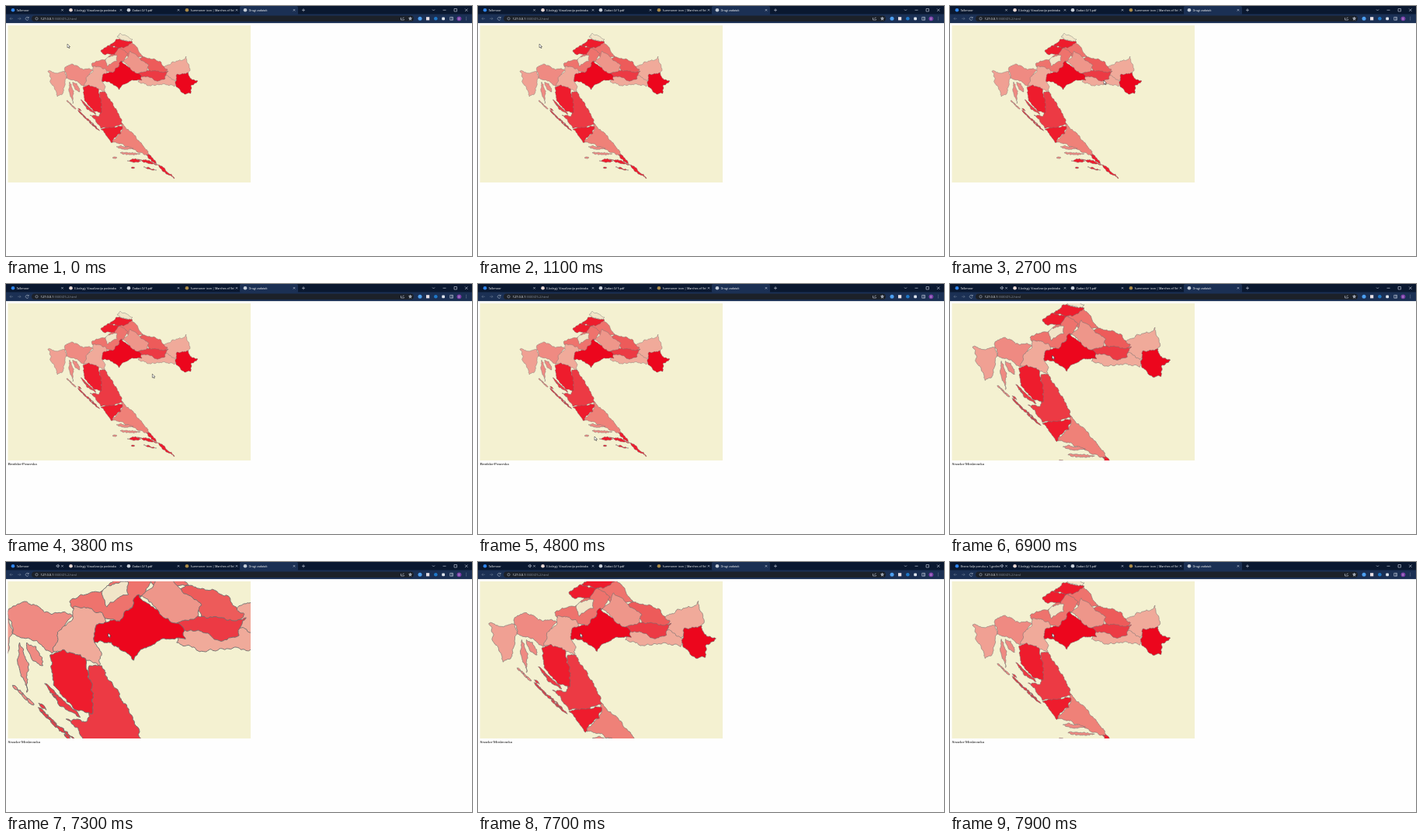
An HTML page that plays this animation: 600 px wide and 323 px high, repeating every 8000 ms.

```html
<!DOCTYPE html>
<html lang="hr">
<head>
<meta charset="utf-8">
<title>Drugi zadatak</title>
<style>
html, body { margin: 0; width: 100%; height: 100%; overflow: hidden; background: #fefefe; }
#stage { display: block; width: 100vw; height: 100vh; }
.ui text { font: 3.7px "Open Sans", "Noto Sans", sans-serif; fill: #fff; }
.ui path { fill: none; stroke: #cdd5e2; stroke-width: .6; }
#label { font: 5px "Liberation Serif", "Times New Roman", serif; fill: #000; }
#map path { stroke: #707070; stroke-width: .4; stroke-linejoin: round; }
</style>
</head>
<body>
<svg id="stage" viewBox="0 0 600 323" preserveAspectRatio="none">
  <g class="ui">
    <rect width="600" height="11" fill="#0a1830"/>
    <rect y="10.5" width="600" height="11.6" fill="#1b3054"/>
    <rect x="301" width="75" height="12" rx="2" fill="#1b3054"/>
    <rect x="33" y="12.5" width="492" height="7.6" rx="3.8" fill="#1c2129"/>
    <g id="tabs"></g>
    <path id="sound" d="M65 4.3h1l1.3-1.2v4L66 5.9h-1zM68.3 4v2"/>
    <path d="M381 5.3h4m-2-2v4M549 4.5l1.5 1.5 1.5-1.5M562.5 5.3h4M577 3.5h3.5v3.5h-3.5zM591 3.5l3.5 3.5m0-3.5l-3.5 3.5"/>
    <path d="M9 16.3H5m1.7-1.7L5 16.3l1.7 1.7M15 16.3h4m-1.7-1.7l1.7 1.7-1.7 1.7" opacity=".4"/>
    <path d="M29 15.4a2 2 0 1 0 .1 1.7m.1-3.3v1.7h-1.7" opacity=".8"/>
    <circle cx="39.5" cy="16.3" r="1.6" fill="none" stroke="#cdd5e2" stroke-width=".5"/>
    <text x="44.5" y="17.7" style="font-size:4px">127.0.0.1<tspan fill="#8d949e">:5500/Z5-2.html</tspan></text>
    <path d="M508.5 15v3h4v-1m-2-.5q.2-1.5 2-1.5M518.5 15.6h4l-3.2 2.6 1.2-4 1.2 4z"/>
    <circle cx="533" cy="16.3" r="2.5" fill="#4d9ff0"/>
    <rect x="541" y="14.2" width="4.2" height="4.2" fill="#e8dfe4"/>
    <circle cx="553.3" cy="16.3" r="2.3" fill="#1f78c8"/>
    <rect x="561.2" y="14.4" width="3.8" height="3.8" rx="1" fill="#dde3ec"/>
    <path d="M571.7 14.4h3.8v3.8h-3.8zM574 14.4v3.8"/>
    <circle cx="583.4" cy="16.3" r="2.9" fill="#7b3fa8"/>
    <text x="582.4" y="17.5" style="font-size:3.3px">E</text>
    <path d="M592.6 14.3v4" stroke-dasharray=".7 1"/>
  </g>
  <svg x="2.5" y="25" width="312.5" height="203" viewBox="2.5 25 312.5 203">
    <rect x="2" y="25" width="314" height="204" fill="#f4f1d1"/>
    <g id="map"></g>
  </svg>
  <text id="label" x="2.5" y="233.9"></text>
  <path id="cursor" d="M0 0V4.9L1.2 3.9 2 5.7 2.9 5.3 2.1 3.6H3.6Z" fill="#fff" stroke="#222" stroke-width=".5"/>
</svg>
<script>
const $ = id => document.getElementById(id);

function tab(x, end, title, icon) {
  $('tabs').insertAdjacentHTML('beforeend',
    `<circle cx="${x}" cy="5.3" r="2.3" fill="${icon}"/>
     <svg x="${x + 4.6}" width="${end - x - 8}" height="11"><text y="6.6">${title}</text></svg>
     <path d="M${end - 1.2} 4.1l2.4 2.4m0-2.4l-2.4 2.4"/>`);
}
tab(9, 72.5, 'Talkmoor', '#2f86ee');
tab(83.5, 148, 'E-kolegij: Vizualizacija podataka', '#e8d8d4');
tab(158, 222, 'Zadaci LV 5.pdf', '#c9d0da');
tab(233, 297, 'Summoner icon | Marches of Velor', '#a98a48');
tab(308, 371, 'Drugi zadatak', '#c3ccd8');
const firstTitle = $('tabs').querySelector('text');

const noise = s => { s = Math.sin(s) * 43758; return s - Math.floor(s); };

// Fractal line from a to b: every midpoint is pushed sideways by seeded noise.
function rough(a, b) {
  const dx = b[0] - a[0], dy = b[1] - a[1], len = Math.hypot(dx, dy);
  if (len < 1.5) return [a];
  const push = (noise(a[0] * 13 + a[1] * 78 + b[0] * 38 + b[1] * 11) - .5) * Math.min(.4, 2.4 / len);
  const m = [(a[0] + b[0]) / 2 - dy * push, (a[1] + b[1]) / 2 + dx * push];
  return [...rough(a, m), ...rough(m, b)];
}
function area(fill, corners) {
  const p = corners.split(' ').map(s => s.split(',').map(Number));
  const line = p.flatMap((a, i) => rough(a, p[(i + 1) % p.length]));
  const d = 'M' + line.map(q => q.map(v => v.toFixed(2))).join('L') + 'Z';
  $('map').insertAdjacentHTML('beforeend', `<path d="${d}" fill="${fill}"/>`);
}
// Slim island starting at x,y and running along dx,dy
function isle(fill, x, y, dx, dy, width) {
  const len = Math.hypot(dx, dy), nx = -dy / len * width / 2, ny = dx / len * width / 2;
  const at = (u, side) => `${x + dx * u + nx * side},${y + dy * u + ny * side}`;
  area(fill, [at(0, 0), at(.3, -1), at(.75, -.8), at(1, 0), at(.6, 1), at(.25, .7)].join(' '));
}

const peach = '#f0aa9a', pink = '#ef8a82', coral = '#ee736d', red = '#ec3a44',
  deep = '#ee1c2d', vivid = '#ec061d', pale = '#f1e5c8';

// Later counties overlap earlier ones, so each border is set by the upper one.
area(coral, '149,47 162,46 170,56 177,66 158,66 146,56');
area(coral, '110,75 119,71 128,69 145,53 151,57 157,62 150,72 138,87 128,84 112,79');
area(deep, '122,58 132,51 146,54 140,63 125,62');
area(deep, '133,51 142,43 157,45 163,46 155,52 146,54');
area(pale, '143,40 147,35 163,43 157,46 150,44');
area(pale, '128,70 131,66 143,64 143,71 136,74 131,78');
area(peach, '203,79 214,72 227,70 232,65 237,82 224,92 212,98 202,92');
area(peach, '172,90 205,90 220,97 217,104 206,102 197,102 185,103 170,98');
area('#ed5b5a', '175,66 190,68 200,73 208,82 204,87 185,86 172,68');
area(red, '169,87 182,83 200,85 209,84 205,94 196,97 182,91 174,91');
area('#ee968a', '160,58 168,63 184,77 182,83 168,89 149,72 157,66');
area(vivid, '218,98 220,88 235,86 237,93 247,97 238,103 238,113 231,114 219,104');
area('#f0a093', '54,84 66,87 76,85 78,93 73,113 66,117 57,96');
area(pink, '76,85 76,79 86,75 96,81 112,83 104,95 100,104 88,96 78,93');
area(peach, '112,78 128,81 130,88 124,98 128,104 127,112 119,108 101,103 103,94 112,84');
area('#ef8178', '150,152 165,167 177,181 187,195 168,188 150,178 137,176 148,163');
area(red, '121,111 128,111 134,121 142,133 150,152 138,159 122,158 108,141 120,142 122,132');
area(deep, '122,159 134,157 150,156 148,165 140,170 136,177 128,166');
area(deep, '99,105 106,102 119,107 122,120 123,138 114,136 101,122');
area(vivid, '124,98 125,88 138,86 144,79 149,71 157,78 174,90 175,96 165,96 152,101 146,108 136,100');

isle(pink, 82, 98, 4, 28, 4);
isle(pink, 86, 98, 9, 13, 6);
isle(red, 96, 121, 12, 13, 2);
isle(red, 100, 127, 16, 13, 3);
for (let i = 0; i < 14; i++) {
  const len = 3 + i * .35;
  isle(i < 4 ? pink : red, 78 + i * 2.4 + noise(i) * 6, 122 + i * 2.5, len, len * .9, 1.6);
}
isle(pink, 142, 182, 22, 2, 4);
isle(pink, 147, 190, 26, 1, 2.5);
isle(pink, 137, 196, 6, 0, 2.5);
isle(deep, 156, 200, 18, 0, 3);
isle(deep, 169, 198, 26, 7, 3);
isle(deep, 181, 192, 13, 12, 5);
isle(deep, 195, 205, 22, 18, 4);
isle(deep, 177, 208, 17, 4, 2);
isle(deep, 161, 209, 5, 0, 2);

// Pointer stops: time, x, y
const stops = [
  [0, 79, 49], [1500, 79, 49], [2100, 198, 96], [3700, 198, 96],
  [4200, 150, 197], [4900, 150, 197], [5600, 131, 134], [6100, 131.5, 92], [8000, 131.5, 92]
];
function pointer(t) {
  const i = stops.findIndex(s => s[0] > t), [t0, x0, y0] = stops[i - 1], [t1, x1, y1] = stops[i];
  const u = (t - t0) / (t1 - t0);
  return [x0 + (x1 - x0) * u, y0 + (y1 - y0) * u];
}
// Wheel notches: six in from 6.8 s, four out from 7.5 s
function notches(t) {
  const count = (from, max) => Math.max(0, Math.min(max, (t - from) / 100 + 1));
  return count(6800, 6) - count(7500, 4);
}

function draw(now) {
  const t = Math.floor(now % 8000 / 100) * 100;
  const k = 2 ** (notches(t) * .2), cx = 131.7, cy = 93.3;
  $('map').setAttribute('transform', `translate(${cx} ${cy}) scale(${k}) translate(${-cx} ${-cy})`);
  $('cursor').setAttribute('transform', `translate(${pointer(t)})`);
  $('label').textContent = t < 3700 ? '' : t < 6100 ? 'Brodsko-Posavska' : 'Sisacko-Moslavacka';
  $('sound').style.display = t < 6400 ? 'none' : '';
  firstTitle.textContent = t < 7900 ? 'Talkmoor' : 'Brano šalje poruku u 1.godini';
  requestAnimationFrame(draw);
}
requestAnimationFrame(draw);
</script>
</body>
</html>
```
